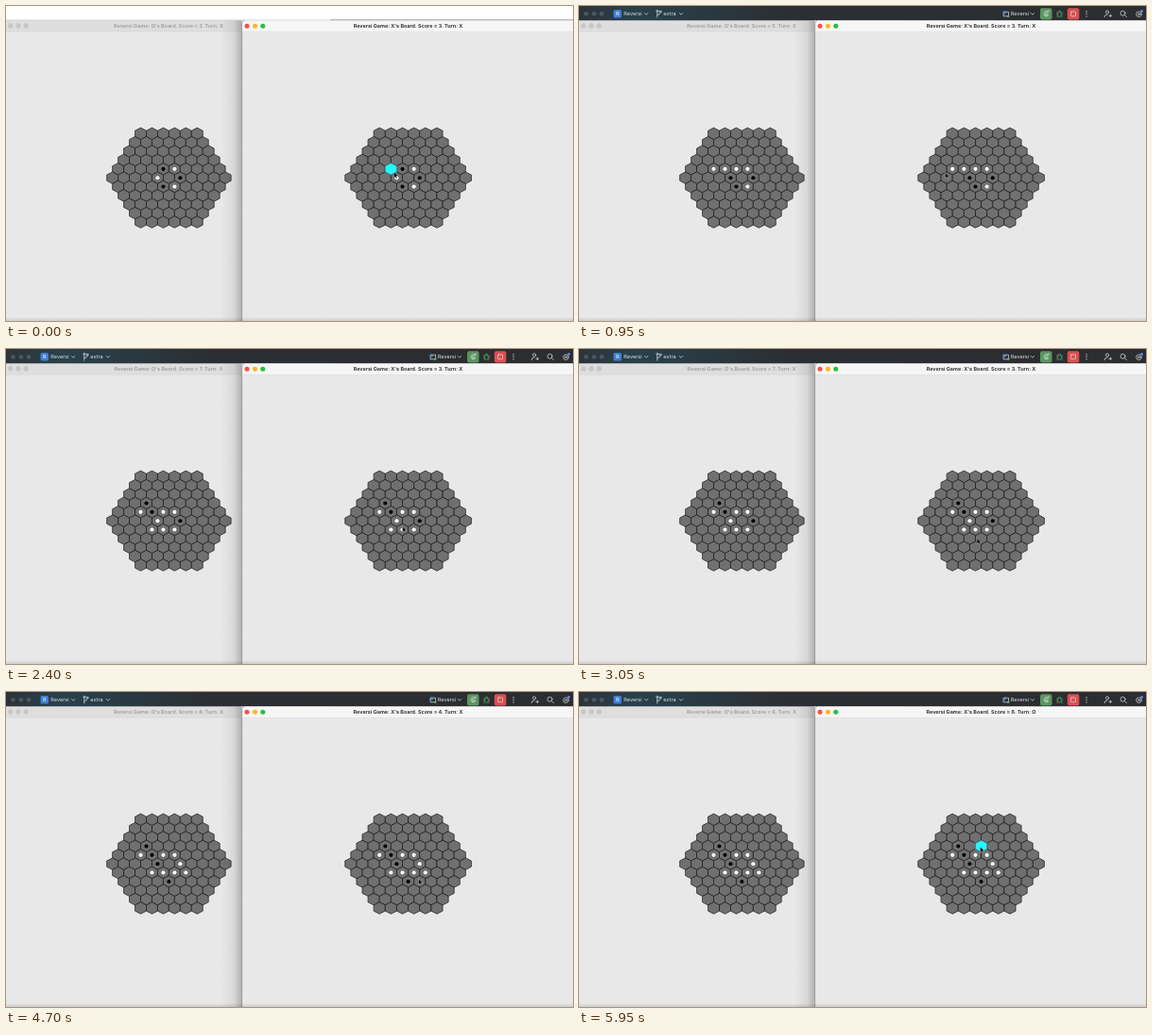
An HTML page for the animation above (6000 ms loop, 600x334 px).

```html
<!DOCTYPE html>
<html lang="en">
<head>
<meta charset="utf-8">
<title>Hex Reversi</title>
<style>
  html, body { margin: 0; width: 100%; height: 100%; overflow: hidden; background: #e8e8e8; }
  svg { display: block; width: 100vw; height: 100vh; }
  text { font-family: Inter, "Open Sans", sans-serif; text-rendering: geometricPrecision; }
  .title { font-size: 5.45px; font-weight: 700; text-anchor: middle; }
  .bar text { font-size: 5.6px; fill: #dfe1e5; }
  .line { fill: none; stroke: #ced0d6; stroke-width: .8; stroke-linecap: round; }
  .hex { fill: #707070; stroke: #171717; stroke-width: .7; }
  .hot { fill: #24f8fc; stroke: #3a8f92; }
</style>
</head>
<body>
<svg viewBox="0 0 600 334" preserveAspectRatio="none">
  <defs>
    <linearGradient id="tint">
      <stop offset="0" stop-color="#2c3338"/>
      <stop offset=".1" stop-color="#29414c"/>
      <stop offset=".36" stop-color="#2b2f33"/>
      <stop offset="1" stop-color="#2b2d30"/>
    </linearGradient>
    <linearGradient id="shade">
      <stop offset="0" stop-color="#000" stop-opacity="0"/>
      <stop offset=".6" stop-color="#000" stop-opacity=".07"/>
      <stop offset="1" stop-color="#000" stop-opacity=".25"/>
    </linearGradient>
    <linearGradient id="foot" x2="0" y2="1">
      <stop offset="0" stop-color="#000" stop-opacity="0"/>
      <stop offset="1" stop-color="#000" stop-opacity=".13"/>
    </linearGradient>
  </defs>

  <rect width="600" height="334" fill="#e8e8e8"/>
  <rect width="600" height="15" fill="#fff"/>
  <path d="M0 15H343" stroke="#c4c4c4" stroke-width=".8"/>
  <path d="M343 15H600" stroke="#4a4a4a" stroke-width=".8"/>

  <g class="bar" id="toolbar">
    <rect width="600" height="15.5" fill="url(#tint)"/>
    <g fill="#4d565c"><circle cx="7.5" cy="8.3" r="2.4"/><circle cx="16" cy="8.3" r="2.4"/><circle cx="24" cy="8.3" r="2.4"/></g>
    <rect x="36.500" y="4" width="8.500" height="8.500" rx="1.500" fill="#3f7fd6"/>
    <text x="39" y="10.300" font-weight="600">R</text>
    <text x="47.300" y="10.300">Reversi</text>
    <text x="89.300" y="10.300">extra</text>
    <text x="456.800" y="10.300">Reversi</text>
    <g class="line">
      <path d="M69.500 7.500l1.700 1.700 1.700-1.700M106.300 7.500l1.700 1.700 1.700-1.700M478.200 7.500l1.700 1.700 1.700-1.700"/>
      <path d="M82.800 6v6M82.800 9.500q3.200 0 3.200-2"/>
      <circle cx="82.800" cy="5.300" r="1"/><circle cx="86" cy="6" r="1"/>
      <path d="M449.500 6.200h5v4.600h-5z"/>
      <circle cx="559" cy="6.400" r="1.600"/><path d="M556 11.700q0-2.700 3-2.700M561 10.300h2.600M562.300 9v2.600"/>
      <circle cx="575.500" cy="7.700" r="2.500"/><path d="M577.400 9.600l2.100 2.100"/>
      <circle cx="592.500" cy="8.700" r="2.800"/><circle cx="592.500" cy="8.700" r=".9"/>
    </g>
    <circle cx="454.300" cy="10.700" r="1.300" fill="#5fad65"/>
    <circle cx="450.500" cy="7" r="1.500" fill="#548af7"/>
    <circle cx="595.500" cy="5.500" r="1.400" fill="#548af7"/>
    <rect x="488" y="2.200" width="12.500" height="12.200" rx="2" fill="#57965c"/>
    <path class="line" d="M496.500 6a2.800 2.800 0 1 0 .3 4M497 4.500v2h-2M494 7.500l2.500 1.500-2.500 1.500z"/>
    <g fill="none" stroke="#57965c" stroke-width=".9">
      <ellipse cx="508.500" cy="8.800" rx="1.900" ry="2.600"/>
      <path d="M505 7h1.700M505 9h1.700M505.300 11.200h1.600M510.400 7h1.700M510.400 9h1.700M510.200 11.200h1.600M507 5l1.500 1 1.500-1"/>
    </g>
    <rect x="516.800" y="2.200" width="12.500" height="12.200" rx="2" fill="#db4f50"/>
    <rect class="line" x="520.600" y="5.900" width="4.900" height="4.900" rx=".6"/>
    <g fill="#ced0d6"><circle cx="537" cy="5.700" r=".7"/><circle cx="537" cy="8.300" r=".7"/><circle cx="537" cy="10.900" r=".7"/></g>
  </g>

  <rect y="15.500" width="250" height="11.700" fill="#dedede"/>
  <path d="M0 27.200H250" stroke="#d2d2d2" stroke-width=".5"/>
  <g fill="#c8c8c8" stroke="#b9b9b9" stroke-width=".4"><circle cx="4.700" cy="21" r="2.400"/><circle cx="13" cy="21" r="2.400"/><circle cx="21.200" cy="21" r="2.400"/></g>
  <text class="title" id="titleO" x="172" y="22.600" fill="#a2a2a2"></text>
  <g id="boardO"></g>
  <rect x="228" y="15.500" width="22" height="318.500" fill="url(#shade)"/>

  <rect x="249.500" y="15.500" width="351" height="319" fill="#e8e8e8"/>
  <rect x="249.500" y="15.500" width="351" height="11.700" fill="#f6f6f6"/>
  <path d="M249.500 27.200H600" stroke="#d4d4d4" stroke-width=".5"/>
  <path d="M249.600 334V18q0-2.500 2.500-2.500" fill="none" stroke="#858585" stroke-width=".7"/>
  <circle cx="255" cy="21.200" r="2.500" fill="#fb4f48"/><circle cx="263.500" cy="21.200" r="2.500" fill="#fcb527"/><circle cx="271.800" cy="21.200" r="2.500" fill="#28bf3e"/>
  <text class="title" id="titleX" x="425.500" y="22.600" fill="#333"></text>
  <g id="boardX"></g>
  <rect y="330" width="600" height="4" fill="url(#foot)"/>
  <path id="cursor" d="M0 0V6.200L1.500 4.900 2.500 7.100 3.500 6.600 2.500 4.600H4.400Z" fill="#000" stroke="#ddd" stroke-width=".4"/>
</svg>

<script>
const LOOP = 6000, STEP = 50, ROW = 9.37, MID_Y = 182.2;
const el = id => document.getElementById(id);

// Cells are "column,row" offsets from the centre hexagon.
const opening = { "-.5,-1": "X", ".5,-1": "O", "-1,0": "O", "1,0": "X", "-.5,1": "X", ".5,1": "O" };
const turns = [
  [400, { "-2.5,-1": "O", "-1.5,-1": "O", "-.5,-1": "O", "-1,0": "X" }],
  [2000, { "-2,-2": "X", "-1.5,-1": "X", "-1,0": "O", "-1.5,1": "O", "-.5,1": "O" }],
  [4300, { "0,2": "X", "-1,0": "X", "1,0": "O", "1.5,1": "O" }]
];
const scoresO = [[0, 3], [400, 5], [2000, 7], [4300, 8]];
const titlesX = [[0, "3. Turn: X"], [50, "5. Turn: O"], [800, "3. Turn: X"], [1700, "5. Turn: O"],
  [2000, "3. Turn: X"], [3850, "6. Turn: O"], [4300, "4. Turn: X"], [5950, "6. Turn: O"]];
const picks = [[0, "-1.5,-1"], [400, ""], [1650, "-2,-2"], [2000, ""], [3800, "0,2"], [4300, ""], [5750, "0,-2"]];
const path = [[0, 410.5, 176], [800, 410.5, 176], [950, 387.5, 176.5], [1350, 396, 173], [1550, 402.5, 166],
  [2050, 402.5, 166], [2400, 419.5, 188], [2650, 423, 203], [3350, 420, 199], [3550, 422.5, 199],
  [4350, 422.5, 199], [4700, 436.5, 198], [5100, 430, 171], [5550, 424.5, 164], [LOOP, 424.5, 164]];

const latest = (list, t) => list.filter(e => e[0] <= t).pop()[1];

function hexagon(x, y, w, kind) {
  const h = ROW * 2 / 3, a = w / 2;
  return `<path class="${kind}" d="M${x} ${y - h}l${a} ${h / 2}v${h}l${-a} ${h / 2}l${-a} ${-h / 2}v${-h}z"/>`;
}

function makeBoard(id, cx, w) {
  let cells = "";
  for (let r = -5; r <= 5; r++) {
    const half = (10 - Math.abs(r)) / 2;
    for (let c = -half; c <= half; c++) cells += hexagon(cx + c * w, MID_Y + r * ROW, w, "hex");
  }
  el(id).innerHTML = cells + "<g></g>";
  const layer = el(id).lastElementChild;
  return (pieces, pick) => {
    const at = key => {
      const [c, r] = key.split(",").map(Number);
      return [cx + c * w, MID_Y + r * ROW];
    };
    const discs = Object.entries(pieces).map(([key, side]) => {
      const [x, y] = at(key);
      return `<circle cx="${x}" cy="${y}" r="2.05" fill="${side === "X" ? "#000" : "#fff"}"/>`;
    });
    layer.innerHTML = (pick ? hexagon(...at(pick), w, "hex hot") : "") + discs.join("");
  };
}

const drawO = makeBoard("boardO", 172.4, 11.95);
const drawX = makeBoard("boardX", 425.6, 12.15);

function cursorAt(t) {
  const i = path.findIndex(p => p[0] > t);
  const [t0, x0, y0] = path[i - 1], [t1, x1, y1] = path[i];
  const u = (t - t0) / (t1 - t0), k = u * u * (3 - 2 * u);
  return `translate(${x0 + (x1 - x0) * k} ${y0 + (y1 - y0) * k})`;
}

let shown = -1;
function render(t) {
  if (t === shown) return;
  shown = t;
  const pieces = Object.assign({}, opening, ...turns.filter(m => m[0] <= t).map(m => m[1]));
  el("toolbar").style.display = t < 50 ? "none" : "";
  el("titleO").textContent = `Reversi Game: O's Board. Score = ${latest(scoresO, t)}. Turn: X`;
  el("titleX").textContent = `Reversi Game: X's Board. Score = ${latest(titlesX, t)}`;
  drawO(pieces, "");
  drawX(pieces, latest(picks, t));
  el("cursor").setAttribute("transform", cursorAt(t));
}

function tick() {
  render(Math.floor(performance.now() % LOOP / STEP) * STEP);
  requestAnimationFrame(tick);
}
render(0);
requestAnimationFrame(tick);
</script>
</body>
</html>
```
